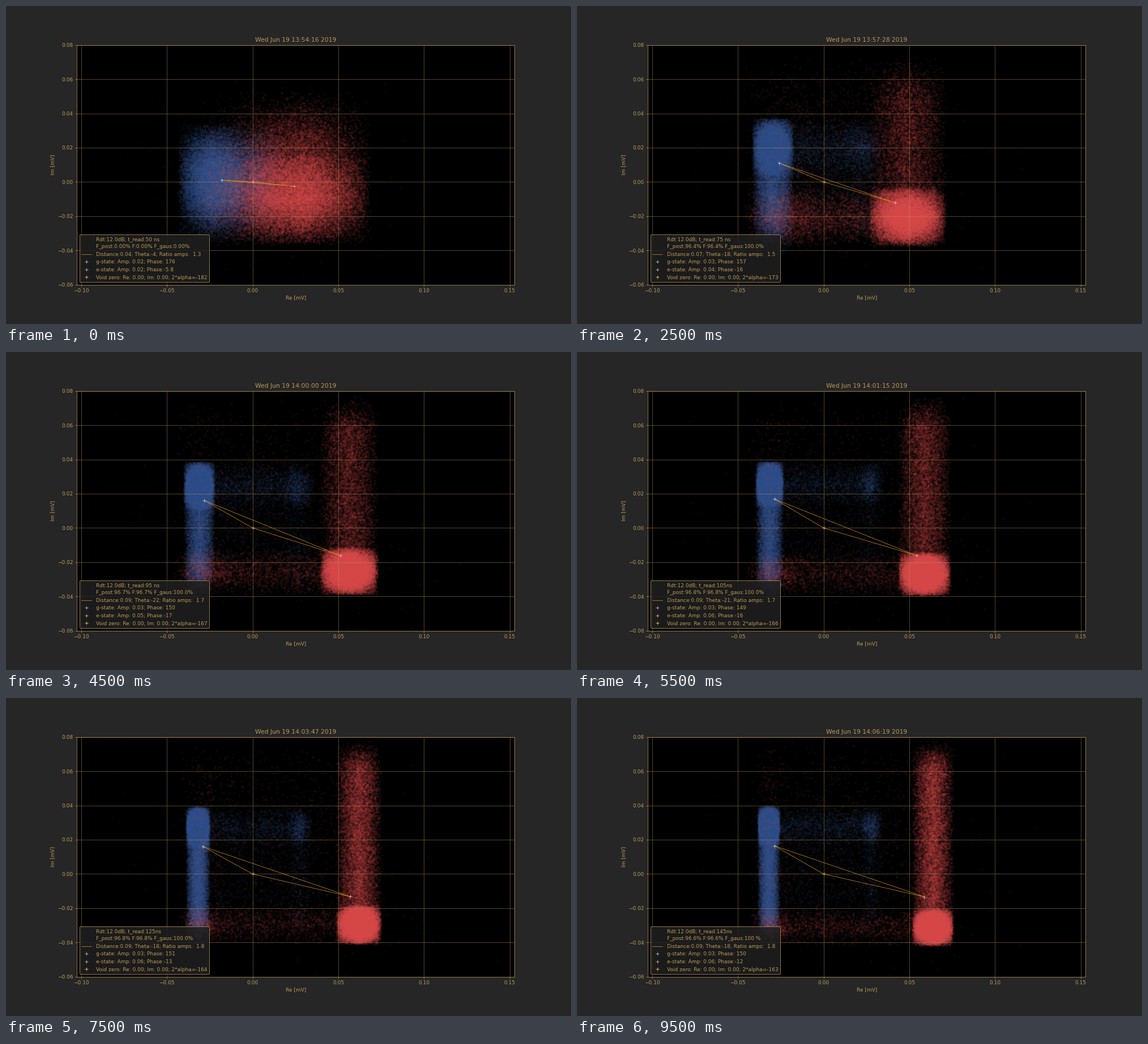
Recreate the animation shown at these times as a matplotlib script. Size 998 px wide and 561 px high, loop 10000 ms.

```python
import numpy as np
import matplotlib.pyplot as plt
from matplotlib.animation import FuncAnimation
from matplotlib.lines import Line2D

W, H, DPI = 998, 561, 64
STEPS, INTERVAL = 20, 500
SHOTS = 45000
KEYS = (0, 3, 7, 11, 19)

BACK, GOLD, ORANGE = "#262626", "#b8985a", "#d2921e"
BLUE, RED = "#3c5c97", "#e65758"
CROSS_G, CROSS_E, CROSS_0 = "#c0cbe6", "#ffb0a8", "#ffd070"


def pt(px):
    return px * 72 / DPI


def settle(start, end, tau):
    """Exponential approach from start to end over the steps."""
    return lambda step: end + (start - end) * np.exp(-step / tau)


def curve(*values):
    """Smooth polynomial through a few key points."""
    coeffs = np.polyfit(KEYS, values, len(KEYS) - 1)
    return lambda step: np.polyval(coeffs, step)


# Positions and widths in units of 1e-3 mV, as (re, im) pairs.
GROUND = dict(
    mean=(curve(-18, -23.8, -27.4, -28.7, -28.7), curve(1.1, 7.1, 14.1, 16.9, 16.4)),
    core=(settle(-23.5, -32.2, 4), settle(9, 29, 6)),
    width=(settle(8.2, 2.4, 6), settle(10.5, 4.5, 6)),
    far=(settle(2, 28, 3), settle(-13, -31, 3)),
)
EXCITED = dict(
    mean=(curve(24.1, 35.3, 47.2, 54.2, 58.6), curve(-2.47, -8.4, -14.9, -16.1, -13.3)),
    core=(settle(31, 66, 7), settle(-10, -34, 9)),
    width=(settle(15.5, 4.5, 6), settle(11, 4.2, 6)),
    far=(settle(3, -31, 3), settle(30, 69, 4)),
)


def mean_of(state, step):
    return np.array([f(step) for f in state["mean"]]) * 1e-3


def sample_axis(rng, state, axis, step):
    """Core peak plus a share of shots that drift towards the far level."""
    mean, core, width, far = (state[k][axis](step) for k in ("mean", "core", "width", "far"))
    stretch = (1.4, 1.0)[axis]
    drift = np.minimum(1, stretch * rng.random(SHOTS))
    share = (mean - core) / ((far - core) * (1 - 0.5 / stretch))
    drift *= rng.random(SHOTS) < share
    # The sum of two uniforms gives a bounded peak with soft edges.
    noise = (rng.random((2, SHOTS)).sum(axis=0) - 1) * np.sqrt(6)
    return core + (far - core) * drift + width * noise


def cloud(state, step, seed):
    rng = np.random.default_rng(seed)
    xy = np.column_stack([sample_axis(rng, state, axis, step) for axis in (0, 1)])
    strays = SHOTS // 600
    xy[:strays] += rng.normal(0, 28, (strays, 2))
    return xy * 1e-3


plt.rcParams.update({
    "font.family": "DejaVu Sans", "font.size": pt(9), "axes.titlesize": pt(10.8),
    "legend.fontsize": pt(9.06),
    "text.color": GOLD, "axes.labelcolor": GOLD, "axes.edgecolor": GOLD,
    "xtick.color": GOLD, "ytick.color": GOLD,
})
fig = plt.figure(figsize=(W / DPI, H / DPI), dpi=DPI, facecolor=BACK)
ax = fig.add_axes([125 / W, 69.3 / H, 773.5 / W, 423 / H], facecolor="black")
ax.set(xlim=(-0.10263, 0.15291), ylim=(-0.06, 0.08),
       xticks=np.arange(-2, 4) * 0.05, yticks=np.arange(-3, 5) * 0.02,
       xlabel="Re [mV]", ylabel="Im [mV]")
ax.grid(color=GOLD, alpha=0.62, lw=0.8)
fig.add_artist(Line2D([0, 1], [0.5 / H] * 2, color="#111111", lw=pt(1)))

dots = [ax.scatter([], [], s=pt(4) ** 2, color=c, alpha=0.06, linewidths=0)
        for c in (BLUE, RED)]
triangle, = ax.plot([], [], color=ORANGE, lw=0.8)


def cross(color):
    return ax.plot([0], [0], "+", color=color, ms=6, mew=0.9, zorder=3)[0]


cross_g, cross_e, cross_0 = map(cross, (CROSS_G, CROSS_E, CROSS_0))
blank = Line2D([], [], color="none")
legend = ax.legend([blank, blank, triangle, cross_g, cross_e, cross_0], ["-"] * 6,
                   loc="lower left", facecolor="#202020", edgecolor=GOLD,
                   framealpha=0.85)


def angle(v):
    return np.degrees(np.arctan2(v[1], v[0]))


def captions(step, g, e):
    f = f"{96.82 - 0.0072 * (step - 13) ** 2:.1f}" if step else "0.00"
    gauss = "0.00" if step == 0 else "100.0" if step < 17 else "100 "
    amp_g, amp_e, dist = (np.hypot(*v) for v in (g, e, e - g))
    phase_e = f"{angle(e):.3f}"[:4].rstrip(".")
    return (
        f"Rdt:12.0dB; t_read:{50 + 5 * step:<3}ns",
        f"F_post:{f}% F:{f}% F_gaus:{gauss}%",
        f"Distance:{dist:.2f}; Theta:{int(angle(e - g))}; Ratio amps:  {amp_e / amp_g:.1f}",
        f"g-state: Amp: {amp_g:.2f}; Phase: {int(angle(g))}",
        f"e-state: Amp: {amp_e:.2f}; Phase:{phase_e}",
        f"Void zero: Re: 0.00; Im: 0.00; 2*alpha={int(angle(e) - angle(g))}",
    )


def update(step):
    g, e = mean_of(GROUND, step), mean_of(EXCITED, step)
    for k, (dot, state) in enumerate(zip(dots, (GROUND, EXCITED))):
        dot.set_offsets(cloud(state, step, 2 * step + k))
    triangle.set_data(*np.array([g, e, (0, 0), g]).T)
    cross_g.set_data(g[:1], g[1:])
    cross_e.set_data(e[:1], e[1:])
    for label, text in zip(legend.get_texts(), captions(step, g, e)):
        label.set_text(text)
    elapsed = round(37.93 * step + 2.2 * (step > 0))
    hours, rest = divmod(13 * 3600 + 54 * 60 + 16 + elapsed, 3600)
    ax.set_title(f"Wed Jun 19 {hours}:{rest // 60:02d}:{rest % 60:02d} 2019")
    return []


anim = FuncAnimation(fig, update, frames=STEPS, interval=INTERVAL,
                     init_func=lambda: update(0), repeat=True, repeat_delay=0)
plt.show()
```
